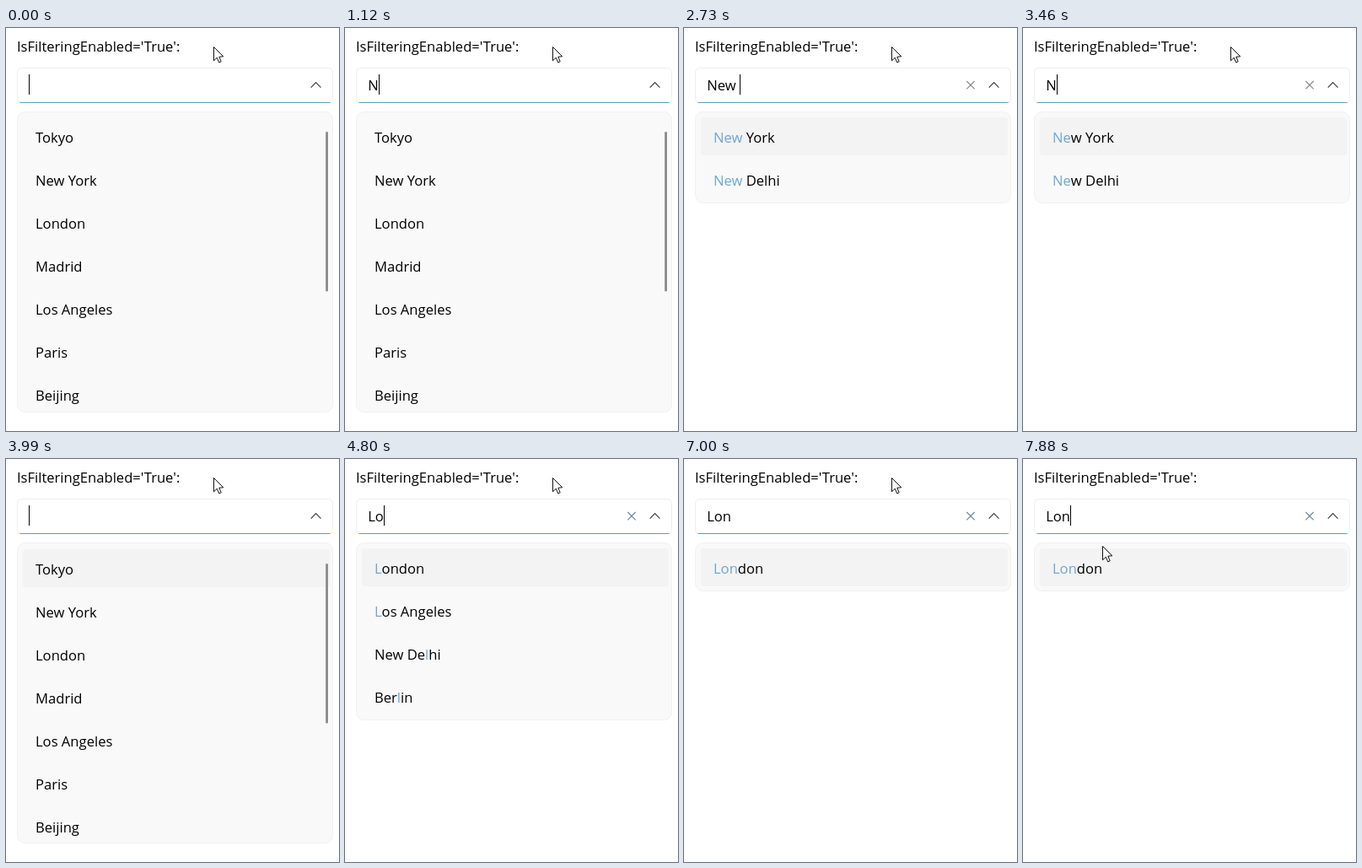
These frames come from a looping animation (395x478 px, 8 s). An HTML page with a canvas:

```html
<!DOCTYPE html>
<html lang="en">
<head>
<meta charset="utf-8">
<title>Filtering combo box</title>
<style>
  html, body { margin: 0; width: 100%; height: 100%; overflow: hidden; background: #fff; }
  canvas { display: block; width: 395px; height: 478px; }
</style>
</head>
<body>
<canvas id="stage"></canvas>
<script>
const W = 395, H = 478, LOOP = 8000;
const FONT = '16.6px "Open Sans", "Noto Sans", sans-serif';
const CITIES = ['Tokyo', 'New York', 'London', 'Madrid', 'Los Angeles', 'Paris',
  'Beijing', 'Singapore', 'New Delhi', 'Bangkok', 'Berlin'];
const ROW = 51, PANEL = { x: 13.5, y: 99.5, w: 374, maxH: 356 };
const ENTRY_X = 27.2, LIST_X = 35, CAPTION_X = 12.9;

// The list follows the typed text with a short delay.
const STATES = [
  { at: 0, typed: '', query: '', clear: 0, plain: true },
  { at: 1120, typed: 'N', query: '', clear: 0, plain: true },
  { at: 1520, typed: 'N', query: 'N', clear: 0.6 },
  { at: 1590, typed: 'N', query: 'N', clear: 1 },
  { at: 1660, typed: 'Ne', query: 'N', clear: 1 },
  { at: 1720, typed: 'Ne', query: 'Ne', clear: 1 },
  { at: 1850, typed: 'New', query: 'Ne', clear: 1 },
  { at: 2050, typed: 'New', query: 'New', clear: 1 },
  { at: 2730, typed: 'New ', query: 'New', clear: 1 },
  { at: 3260, typed: 'New', query: 'New', clear: 1 },
  { at: 3390, typed: 'Ne', query: 'New', clear: 1 },
  { at: 3460, typed: 'N', query: 'Ne', clear: 1 },
  { at: 3790, typed: '', query: '', clear: 0.4 },
  { at: 3990, typed: '', query: '', clear: 0, shift: 1 },
  { at: 4800, typed: 'Lo', query: 'L', clear: 1 },
  { at: 4930, typed: 'Lo', query: 'Lo', clear: 1 },
  { at: 5460, typed: 'Lon', query: 'Lo', clear: 1 },
  { at: 5530, typed: 'Lon', query: 'Lon', clear: 1 },
  { at: 7000, typed: 'Lon', query: 'Lon', clear: 1, noCaret: true },
  { at: 7530, typed: 'Lon', query: 'Lon', clear: 1 }
];

const canvas = document.getElementById('stage');
const ctx = canvas.getContext('2d');
const dpr = window.devicePixelRatio || 1;
canvas.width = W * dpr;
canvas.height = H * dpr;

function roundRect(x, y, w, h, r, fill, stroke) {
  ctx.beginPath();
  ctx.roundRect(x, y, w, h, r);
  if (fill) { ctx.fillStyle = fill; ctx.fill(); }
  if (stroke) { ctx.strokeStyle = stroke; ctx.lineWidth = 1; ctx.stroke(); }
}

function polyline(points, color, width) {
  ctx.beginPath();
  points.forEach(([x, y]) => ctx.lineTo(x, y));
  ctx.strokeStyle = color;
  ctx.lineWidth = width;
  ctx.stroke();
}

function text(str, x, y, color = '#000') {
  ctx.fillStyle = color;
  ctx.fillText(str, x, y);
}

const widthOf = str => ctx.measureText(str).width;
const matchAt = (name, query) => name.toLowerCase().indexOf(query.toLowerCase());

function drawName(name, query, x, y) {
  const start = matchAt(name, query), end = start + query.length;
  text(name.slice(0, start), x, y);
  text(name.slice(start, end), x + widthOf(name.slice(0, start)), y, '#6fa6d3');
  text(name.slice(end), x + widthOf(name.slice(0, end)), y);
}

function drawEntry(state, t) {
  roundRect(13.5, 47.5, 374, 41, 5, '#fff', '#eeeeee');
  ctx.save();
  ctx.beginPath();
  ctx.roundRect(13, 47, 375, 42, 5);
  ctx.clip();
  ctx.fillStyle = '#559dca';
  ctx.fillRect(13, 88, 375, 1);
  ctx.restore();

  text(state.typed, ENTRY_X, 74);
  if (!state.noCaret) {
    ctx.fillStyle = '#000';
    ctx.fillRect(Math.round(ENTRY_X + widthOf(state.typed)), 55, 1, 24);
  }
  if (state.clear) {
    const color = t < 3990 ? '#858585' : '#6585a0';
    ctx.globalAlpha = state.clear;
    polyline([[335.3, 63], [344.7, 72.4]], color, 1.1);
    polyline([[344.7, 63], [335.3, 72.4]], color, 1.1);
    ctx.globalAlpha = 1;
  }
  polyline([[361.7, 70.6], [367.6, 64.7], [373.5, 70.6]], '#3c3c3c', 1.2);
}

function drawList({ query, plain, shift = 0 }) {
  const names = CITIES.filter(name => matchAt(name, query) >= 0);
  const fullH = names.length * ROW + 6;
  const h = Math.min(fullH, PANEL.maxH);
  roundRect(PANEL.x, PANEL.y, PANEL.w, h, 9, '#f9f9f9', '#f0f0f0');
  ctx.save();
  ctx.beginPath();
  ctx.rect(PANEL.x, PANEL.y, PANEL.w, h - 1);
  ctx.clip();
  if (!plain) roundRect(20, 106 + shift, 364, 45, 4, '#f3f3f3');
  names.forEach((name, i) => drawName(name, query, LIST_X, 136 + shift + i * ROW));
  if (fullH > h) {
    roundRect(379.2, 123 + shift, 2.8, 302 * h / fullH, 1.4, '#8b8b8b');
  }
  ctx.restore();
}

function drawPointer(t) {
  const step = Math.max(0, Math.min(6, Math.floor((t - 7530) / 69) + 1));
  const p = step / 6, eased = p * p * (3 - 2 * p);
  ctx.save();
  ctx.translate(246.5 - 152 * eased, 22.5 + 81 * eased);
  ctx.beginPath();
  [[0, 0], [0, 16.3], [3.8, 12.7], [6.2, 18.4], [8.7, 17.3], [6.3, 11.7], [11.3, 11.3]]
    .forEach(([x, y]) => ctx.lineTo(x, y));
  ctx.closePath();
  ctx.fillStyle = '#fff';
  ctx.fill();
  ctx.strokeStyle = '#111';
  ctx.lineWidth = 1;
  ctx.stroke();
  ctx.restore();
}

function draw(now) {
  const t = now % LOOP;
  const state = STATES.findLast(s => s.at <= t);
  ctx.setTransform(dpr, 0, 0, dpr, 0, 0);
  ctx.fillStyle = '#fff';
  ctx.fillRect(0, 0, W, H);
  ctx.font = FONT;
  text("IsFilteringEnabled='True':", CAPTION_X, 28);
  drawEntry(state, t);
  drawList(state);
  drawPointer(t);
}

let origin;
function tick(now) {
  origin ??= now;
  draw(Math.max(0, now - origin));
  requestAnimationFrame(tick);
}
draw(0);
requestAnimationFrame(tick);
</script>
</body>
</html>
```
